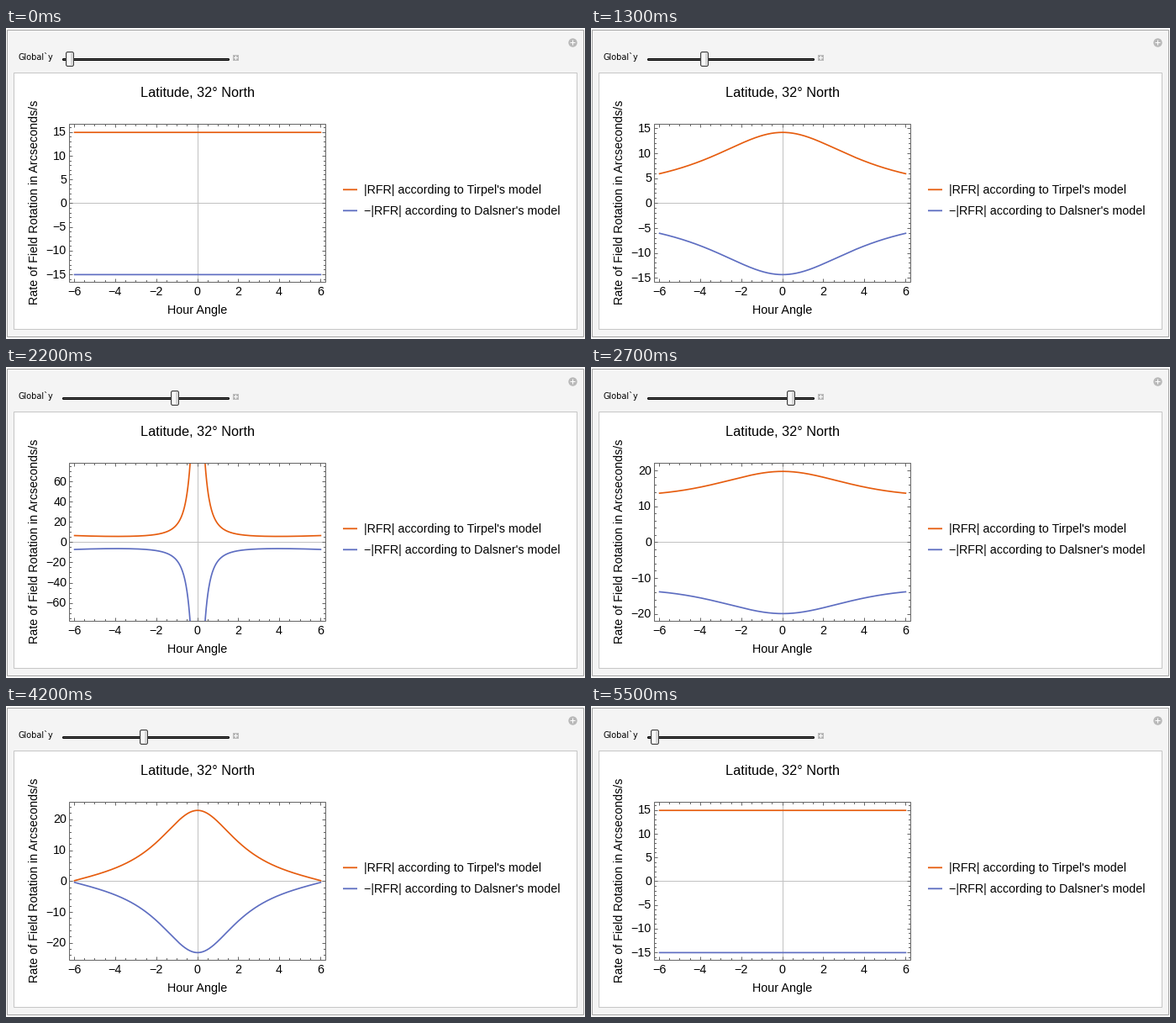
These frames come from a looping animation (689x370 px, 6 s). A matplotlib script:

```python
import numpy as np
import matplotlib.pyplot as plt
from matplotlib.animation import FuncAnimation
from matplotlib.collections import LineCollection
from matplotlib.patches import Circle, FancyBboxPatch, Rectangle

W, H, DPI = 689, 370, 100
PT = 72 / DPI
ORANGE, BLUE = "#e65c0e", "#5d6dc1"
LEFT, RIGHT, TOP, BOTTOM = 75.5, 380.5, 114.5, 302.5
MID_X, MID_Y = 228, 208.8
HOUR_PX = (RIGHT - LEFT) * 0.96 / 12
HALF_H = (BOTTOM - TOP) / 2
LATITUDE = np.radians(32)
FRAMES, HOLD = 60, 5
MAX_LIMIT = 78

# Straight lines are placed on pixel centres by hand.
plt.rcParams["path.snap"] = False

fig = plt.figure(figsize=(W / DPI, H / DPI), dpi=DPI, facecolor="white")
ax = fig.add_axes([0, 0, 1, 1])
ax.set_xlim(0, W)
ax.set_ylim(H, 0)
ax.axis("off")


def text(x, y, s, px=14.2, ha="left", font="Liberation Sans", **kw):
    return ax.text(x, y, s, fontsize=px * PT, ha=ha, va="baseline",
                   family=font, color="black", **kw)


def line(xs, ys, color, px=1, **kw):
    return ax.plot(xs, ys, color=color, lw=px * PT, **kw)[0]


def box(x0, y0, x1, y1, face, edge, z=0):
    patch = Rectangle((x0, y0), x1 - x0, y1 - y0, facecolor=face,
                      edgecolor=edge, lw=PT, zorder=z)
    return ax.add_patch(patch)


def rounded(x, y, w, h, r, face, edge, z):
    patch = FancyBboxPatch((x, y), w, h, facecolor=face, edgecolor=edge,
                           boxstyle=f"round,pad=0,rounding_size={r}",
                           lw=PT, zorder=z)
    return ax.add_patch(patch)


def plus(x, y, r):
    line([x - r, x + r], [y, y], "white", 1, zorder=5, solid_capstyle="butt")
    line([x, x], [y - r, y + r], "white", 1, zorder=5, solid_capstyle="butt")


def number(v):
    return f"{v:d}".replace("-", "\u2212")


def x_px(hours):
    return MID_X + hours * HOUR_PX


def centre(v):
    """Centre of the pixel that holds v."""
    return np.floor(v) + 0.5


def rotation_rate(hours, dec):
    """Field rotation in arcseconds per second for a declination in radians."""
    sin_alt = (np.sin(LATITUDE) * np.sin(dec)
               + np.cos(LATITUDE) * np.cos(dec) * np.cos(hours * np.pi / 12))
    return 15 * (np.sin(dec) - np.sin(LATITUDE) * sin_alt) / (1 - sin_alt**2)


def declination(n):
    step = max(0, min(n, FRAMES - 1 - n) - HOLD + 1)
    return -90 if step == 0 else -89.7 + 360 / 49 * (step - 1)


# Panel and controls
box(1.5, 2.5, 687.5, 367.5, "#f4f4f4", "#a3a3a3")
box(9.5, 53.5, 679.5, 358.5, "white", "#c6c6c6")
ax.add_patch(Circle((674.5, 17.5), 5.2, color="#b9b9b9", lw=0, zorder=4))
plus(674.5, 17.5, 3)
ax.add_patch(Rectangle((270, 32), 7, 7, color="#b9b9b9", lw=0, zorder=4))
plus(273.5, 35.5, 2.5)
text(14.8, 38.4, "Global`y", 9.8, font="DejaVu Sans")
rounded(67.5, 36.5, 198, 2, 1, "#555555", "black", 2)
knob = rounded(71.5, 28.5, 9, 17, 2, "#d6d6d6", "#3c3c3c", 6)
shine = ax.add_patch(Rectangle((73, 30), 4, 14, color="#f6f6f6", lw=0, zorder=7))

# Plot frame
line([centre(MID_X)] * 2, [TOP, BOTTOM], "#c2c2c2", zorder=1)
line([LEFT, RIGHT], [centre(MID_Y)] * 2, "#c2c2c2", zorder=1)
frame = box(LEFT, TOP, RIGHT, BOTTOM, "none", "#666666", 4)

x_ticks = []
for i in range(-12, 13):
    x = centre(x_px(i / 2))
    size = 4 if i % 4 == 0 else 2.5
    x_ticks += [[(x, BOTTOM), (x, BOTTOM - size)], [(x, TOP), (x, TOP + size)]]
    if i % 4 == 0:
        text(x_px(i / 2) - 0.6, 318, number(i // 2), ha="center")
ax.add_collection(LineCollection(x_ticks, colors="#666666", lw=PT, zorder=4))
y_ticks = ax.add_collection(LineCollection([], colors="#666666", lw=PT, zorder=4))
y_labels = [text(72, 0, "", ha="right") for _ in range(9)]

text(MID_X, 82, "Latitude, 32\u00b0 North", 16.2, "center")
text(MID_X, 340, "Hour Angle", 14.4, "center")
text(38.5, 207, "Rate of Field Rotation in Arcseconds/s", 14.3, "center",
     rotation=90, rotation_mode="anchor")

# Legend
for y, color, label in ((192.3, ORANGE, "|RFR| according to Tirpel's model"),
                        (217.3, BLUE, "\u2212|RFR| according to Dalsner's model")):
    line([401, 418], [y, y], color, 1.8, solid_capstyle="butt")
    text(426, y + 4.7, label)

hours = np.linspace(-6, 6, 601)
curves = [line([], [], c, 1.7, zorder=3) for c in (ORANGE, BLUE)]
for curve in curves:
    curve.set_clip_path(frame)


def set_y_axis(limit):
    major = 5 if limit < 20 else 10 if limit < 40 else 20
    minor = {5: 1, 10: 2, 20: 5}[major]
    scale = HALF_H / limit
    segments, majors = [], []
    count = int(limit / minor)
    for i in range(-count, count + 1):
        value = i * minor
        y = MID_Y - value * scale
        tick_y = centre(y)
        is_major = value % major == 0
        size = 4 if is_major else 2.5
        segments += [[(LEFT, tick_y), (LEFT + size, tick_y)],
                     [(RIGHT, tick_y), (RIGHT - size, tick_y)]]
        if is_major:
            majors.append((value, y))
    y_ticks.set_segments(segments)
    for label in y_labels:
        label.set_text("")
    for label, (value, y) in zip(y_labels, majors):
        label.set_text(number(value))
        label.set_y(np.floor(y - 0.4) + 5)


def update(n):
    degrees = declination(n)
    rate = np.abs(rotation_rate(hours, np.radians(degrees)))
    limit = min(rate.max() / 0.9, MAX_LIMIT)
    for curve, sign in zip(curves, (1, -1)):
        curve.set_data(x_px(hours), MID_Y - sign * rate * HALF_H / limit)
    set_y_axis(limit)

    x = round(76.28 + 0.996 * (degrees + 90))
    knob.set_x(x - 4.5)
    shine.set_x(x - 3)
    return [*curves, y_ticks, *y_labels, knob, shine]


anim = FuncAnimation(fig, update, frames=FRAMES, interval=100, repeat=True,
                     repeat_delay=0, blit=False)
plt.show()
```
